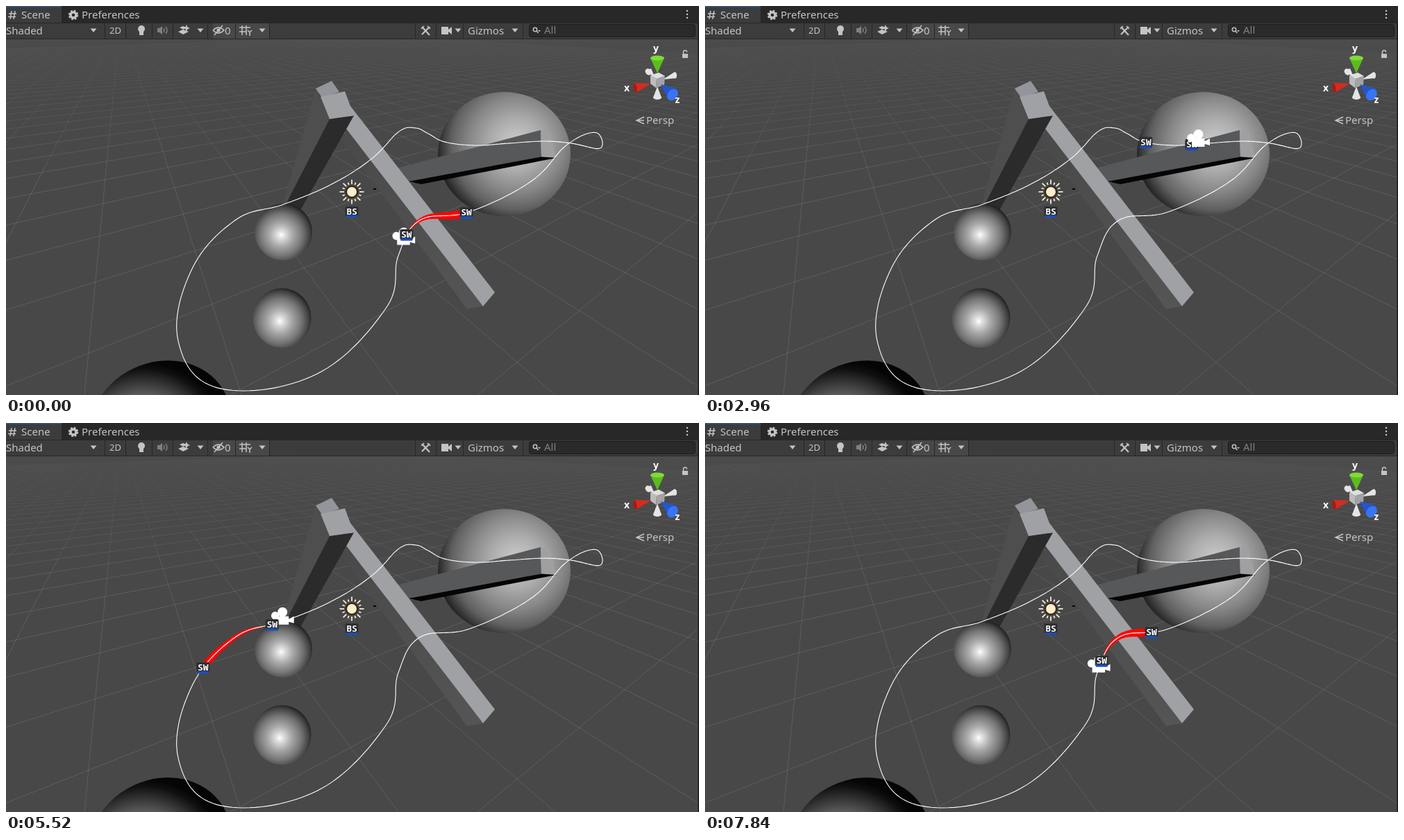
An HTML page that plays this animation: 998 by 561 pixels, repeating every 7920 ms.

```html
<!DOCTYPE html>
<html lang="en">
<head>
<meta charset="utf-8">
<title>Scene view</title>
<style>
html, body { margin: 0; width: 100%; height: 100%; overflow: hidden; background: #484848; }
svg { display: block; width: 100%; height: 100%; }
text { font-family: "Noto Sans", "Open Sans", sans-serif; font-size: 15px; fill: #c4c4c4; }
.axis { font-weight: 700; font-size: 14px; fill: #fff; text-anchor: middle; }
.tag { font: 700 13px "Noto Sans Mono", "DejaVu Sans Mono", monospace; fill: #fff; text-anchor: middle;
  stroke: #222; stroke-width: 1.5px; paint-order: stroke; }
.icon { fill: #c4c4c4; }
.line { fill: none; stroke: #c4c4c4; stroke-width: 1.5; }
.dim { fill: #808080; }
</style>
</head>
<body>
<svg viewBox="0 0 998 561">
  <defs>
    <radialGradient id="ballBig" gradientUnits="userSpaceOnUse" cx="735" cy="200" r="125">
      <stop offset="0" stop-color="#cfcfcf"/><stop offset=".3" stop-color="#acacac"/>
      <stop offset=".55" stop-color="#868686"/><stop offset=".75" stop-color="#606060"/>
      <stop offset=".9" stop-color="#2a2a2a"/><stop offset="1" stop-color="#0c0c0c"/>
    </radialGradient>
    <radialGradient id="ball" cx=".46" cy=".55" r=".57">
      <stop offset="0" stop-color="#fff"/><stop offset=".12" stop-color="#dedede"/>
      <stop offset=".35" stop-color="#aaa"/><stop offset=".65" stop-color="#757575"/>
      <stop offset=".88" stop-color="#404040"/><stop offset="1" stop-color="#1a1a1a"/>
    </radialGradient>
    <radialGradient id="ballLow" gradientUnits="userSpaceOnUse" cx="185" cy="625" r="125">
      <stop offset="0" stop-color="#b0b0b0"/><stop offset=".5" stop-color="#7c7c7c"/>
      <stop offset=".72" stop-color="#434343"/><stop offset=".92" stop-color="#101010"/>
      <stop offset="1" stop-color="#050505"/>
    </radialGradient>
    <linearGradient id="haze" x1="0" y1="0" x2="0" y2="1">
      <stop offset="0" stop-color="#4b4b4b" stop-opacity=".9"/>
      <stop offset="1" stop-color="#484848" stop-opacity="0"/>
    </linearGradient>
    <linearGradient id="side" x1="0" y1="0" x2="0" y2="1">
      <stop offset="0" stop-color="#494949"/><stop offset="1" stop-color="#555"/>
    </linearGradient>
    <clipPath id="behind">
      <path clip-rule="evenodd" d="M0 0H998V561H0ZM497 146L704 413L687 433L664 437L484 193Z"/>
    </clipPath>
    <path id="drop" d="M-4.5 -2.5H4.5L0 3Z"/>
    <g id="badge">
      <rect x="-9.5" y="-8" width="19" height="15" rx="2" fill="#2e3036"/>
      <rect x="-8.5" y="4.5" width="17" height="4" fill="#1d4db4"/>
    </g>
    <g id="sw"><use href="#badge"/><text class="tag" y="4">SW</text></g>
    <g id="camShape" fill="#fff">
      <circle cx="-10" cy="-1" r="5.8"/><circle cx=".5" cy="-6" r="7"/>
      <path d="M-9 0H9.5V12H-9ZM9.5 4L17 0V10L9.5 8Z"/>
    </g>
  </defs>

  <rect width="998" height="561" fill="#484848"/>
  <path id="grid" fill="none" stroke="#fff" stroke-opacity=".13" stroke-width=".9"/>
  <rect y="47" width="998" height="200" fill="url(#haze)"/>

  <!-- solids -->
  <ellipse cx="717.5" cy="213.5" rx="95.5" ry="89.5" fill="url(#ballBig)"/>
  <path d="M555 236L770 179L771 218L570 255Z" fill="#57585a"/>
  <path d="M770 179L784 183L792 219L771 219Z" fill="#a0a0a2"/>
  <path d="M580 253L771 217.500L793 219L598 257ZM529 263H533V265H529Z" fill="#050505"/>
  <path d="M492 178L687 433L664 437L484 193Z" fill="url(#side)"/>
  <path d="M495 143L704 413L687 433L490 177Z" fill="#a0a1a5"/>
  <path d="M446 119L466 163L404 292L397 292Z" fill="#4e4e4e"/>
  <path d="M466 163L501 158L422 298L401 290Z" fill="#2b2b2b"/>
  <path d="M446 119L469 108L480 124L455 132Z" fill="#94959a"/>
  <path d="M453 131L488 123L501 158L466 163Z" fill="#a0a1a5"/>
  <ellipse cx="399.5" cy="326" rx="41.5" ry="41" fill="url(#ball)"/>
  <ellipse cx="397.5" cy="450" rx="42" ry="43" fill="url(#ball)"/>
  <ellipse cx="222" cy="604" rx="104" ry="90" transform="rotate(-25 222 604)" fill="url(#ballLow)"/>

  <path id="ribbon" fill="#f00"/>
  <path id="car" d="M-8 -8L-3 -15L9 -13L8 -4L-8 -4Z" fill="#5b5b5b"/>
  <path id="track" fill="none" stroke="#fff" stroke-width="1.1"/>

  <!-- light -->
  <g transform="translate(498 268)">
    <g id="rays" stroke="#fff3da" stroke-width="1.7"></g>
    <circle r="8" fill="#ffecc9" stroke="#2a2520" stroke-width="2"/>
  </g>
  <g transform="translate(498 297)"><use href="#badge"/><text class="tag" y="4">BS</text></g>
  <g id="actors">
    <use id="head" href="#sw"/><use id="cam" href="#camShape"/><use id="tail" href="#sw"/>
  </g>

  <!-- axis gizmo -->
  <g fill="#e4e4e4">
    <path d="M920 94L929 90L934 102Z"/><path d="M963 95L965 104L946 106Z"/><path d="M932 132H944L938 116Z"/>
    <ellipse cx="925" cy="95" rx="4" ry="5" transform="rotate(-35 925 95)"/>
    <ellipse cx="963.5" cy="100" rx="2.5" ry="4.5"/><ellipse cx="938" cy="132" rx="6" ry="3"/>
  </g>
  <path d="M928 100L937 105L936 118L928 112Z" fill="#bcbcbc"/>
  <path d="M928 100L940 96L949 101L937 105Z" fill="#dedede"/>
  <path d="M937 105L949 101L948 114L936 118Z" fill="#a3a3a3"/>
  <path d="M928 75H948L938 97Z" fill="#5dbb1f"/><ellipse cx="938" cy="75" rx="10" ry="3.5" fill="#7fdc36"/>
  <path d="M904 111L907 125L929 112Z" fill="#d62b20"/>
  <ellipse cx="906" cy="118" rx="2.5" ry="7" transform="rotate(-12 906 118)" fill="#a51c15"/>
  <path d="M943 113L966 119L954 135Z" fill="#2456cf"/>
  <ellipse cx="960" cy="128" rx="9" ry="7" transform="rotate(-50 960 128)" fill="#3974f2"/>
  <text class="axis" x="936" y="66">y</text><text class="axis" x="894" y="123">x</text><text class="axis" x="967" y="140">z</text>
  <path class="icon" d="M974 69H982V75H974Z"/><path class="line" d="M975.5 69V66.5A2.5 2.5 0 0 1 980.5 66.5"/>
  <path class="line" d="M919 160L908 165L919 170M908 165H919"/>
  <text x="922" y="170">Persp</text>

  <!-- tabs -->
  <rect width="998" height="24" fill="#282828"/>
  <rect width="80" height="24" fill="#3c3c3c"/><rect width="80" height="1.5" fill="#2c5d87"/>
  <path class="line" d="M8 7L6 19M13 7L11 19M4 11H15M3 15.5H14"/>
  <text x="22" y="18">Scene</text>
  <circle cx="97" cy="13" r="4" fill="none" stroke="#c4c4c4" stroke-width="3.5"/>
  <circle cx="97" cy="13" r="6" fill="none" stroke="#c4c4c4" stroke-width="2.5" stroke-dasharray="2.6 2.112"/>
  <text x="109" y="18">Preferences</text>
  <path d="M981 7V18" stroke="#c4c4c4" stroke-width="2.6" stroke-linecap="round" stroke-dasharray="0 5"/>

  <!-- toolbar -->
  <rect y="24" width="998" height="23" fill="#3c3c3c"/>
  <path d="M298 25H380V47H298Z" fill="#484848"/>
  <path id="seams" stroke="#272727"/>
  <g id="drops" class="icon"></g>
  <text x="0" y="40.5">Shaded</text>
  <g class="icon">
    <circle cx="195" cy="33" r="5"/><path d="M192 36H198V42H192Z"/>
    <path d="M248 37L255 34L263 37L255 41ZM250 31L255 29L260 31L255 34Z"/>
    <path d="M260 27L261.5 30.5L265 32L261.5 33.5L260 37L258.5 33.5L255 32L258.5 30.5Z"/>
    <path d="M627 30H637V41H627ZM637 34L642 30V41L637 37Z"/>
  </g>
  <path class="dim" d="M218 32H221L225 29V41L221 38H218Z"/>
  <path class="line" style="stroke:#808080" d="M227 32Q229 35 227 38M230 30Q234 35 230 40"/>
  <text x="149" y="40" style="font-size:13px">2D</text>
  <path class="line" d="M298 35Q306 27 314 35Q306 43 298 35M300 42L312 28"/><circle class="icon" cx="306" cy="35" r="2.5"/>
  <text x="315" y="40.5">0</text>
  <path class="line" d="M340 28V42M346 28V42M336 31H352M336 37H346M348 35L351 38L354 35M351 38V43"/>
  <path class="line" style="stroke-width:2.2" d="M599 30L610 42M610 30L599 41"/>
  <path class="line" d="M598 33L602 29M607 29L611 33"/>
  <text x="665" y="40.5">Gizmos</text>
  <rect x="753.5" y="26.5" width="239" height="18" rx="3" fill="#2a2a2a" stroke="#1c1c1c"/>
  <circle class="line" cx="762" cy="34" r="2.7"/><path class="line" d="M764 36L766.5 39"/>
  <use class="icon" href="#drop" transform="translate(768 36) scale(.45)"/>
  <text class="dim" x="775" y="40">All</text>
  <rect x="996.5" y="24" width="1.5" height="537" fill="#191919"/>
</svg>
<script>
const LOOP = 7920, STEPS = 103, STAMP = 40;
const HEAD_LAG = 480, CAM_LAG = 65, CAM_LIFT = 8;
const $ = id => document.getElementById(id);
const wrap = t => (t % LOOP + LOOP) % LOOP;

// key points of the closed track, passed at equal intervals of time
const knots = [
  [596, 309], [667, 297], [756, 253], [808, 200], [849, 182.5], [856, 205], [814, 198], [775, 195],
  [724, 198], [676, 201], [632, 196], [608, 184], [590, 176], [566, 181], [527, 220], [469, 257],
  [400, 286], [330, 309], [267, 381], [248, 483], [306, 551], [445, 532], [547, 436], [565, 360]
];
const TENSION = .56;

// rear marker at a time: a cardinal spline through the key points
function place(t) {
  const n = knots.length, u = wrap(t) / LOOP * n - .5, i = Math.floor(u), s = u - i;
  const [a, b, c, d] = [-1, 0, 1, 2].map(k => knots[(i + k + n) % n]);
  const s2 = s * s, s3 = s2 * s;
  return [0, 1].map(k =>
    (2 * s3 - 3 * s2 + 1) * b[k] + (s3 - 2 * s2 + s) * TENSION * (c[k] - a[k]) +
    (3 * s2 - 2 * s3) * c[k] + (s3 - s2) * TENSION * (d[k] - b[k]));
}

// 1 at the point of the lap closest to the viewer, -1 at the farthest
const nearness = t => Math.cos(2 * Math.PI * (t - 6900) / LOOP);
const polygon = pts => "M" + pts.map(p => p.map(v => v.toFixed(1)).join(" ")).join("L") + "Z";

function ribbon(t) {
  const width = 5.5 + 9 * nearness(t), left = [], right = [];
  if (width <= 0) return "";
  for (let s = .12; s <= 1; s += .04) {
    const u = t + HEAD_LAG * s, [x, y] = place(u), [x0, y0] = place(u - 4), [x1, y1] = place(u + 4);
    const half = width * Math.min(1, .05 + 1.1 * s) / 2 / Math.hypot(x1 - x0, y1 - y0);
    const nx = (y0 - y1) * half, ny = (x1 - x0) * half;
    left.push([x + nx, y + ny]);
    right.unshift([x - nx, y - ny]);
  }
  return polygon(left.concat(right));
}

function drawStatic() {
  const pts = [];
  for (let t = 0; t < LOOP; t += 20) pts.push(place(t));
  $("track").setAttribute("d", polygon(pts));

  // ground lines run to two vanishing points on a hidden horizon
  let d = "";
  for (let k = -34; k <= 40; k++) d += `M165 20L${113 + 226 * k} 561`;
  for (let k = -45; k <= 9; k++) d += `M1330 20L${-33 + 356 * k} 561`;
  $("grid").setAttribute("d", d);

  let rays = "";
  for (let a = 0; a < 360; a += 22.5)
    rays += `<path d="M0 -11V${a % 45 ? -14.5 : -17.5}" transform="rotate(${a})"/>`;
  $("rays").innerHTML = rays;

  $("drops").innerHTML = [126, 280, 369, 651, 733].map(x => `<use href="#drop" x="${x}" y="35"/>`).join("");
  $("seams").setAttribute("d", "M0 24.5H998M0 47.5H998" +
    [142, 172, 210, 240, 290, 330, 379, 589, 619, 658, 744].map(x => `M${x}.5 24V47`).join(""));
}

const move = (el, [x, y]) => el.setAttribute("transform", `translate(${x.toFixed(1)} ${y.toFixed(1)})`);

function draw(t) {
  const tail = place(t), [cx, cy] = place(t - CAM_LAG);
  move($("tail"), tail);
  move($("car"), tail);
  move($("head"), place(t + HEAD_LAG));
  move($("cam"), [cx, cy - CAM_LIFT]);
  $("car").style.display = nearness(t) > .9 ? "" : "none";

  // on the far half the bar hides the ribbon; on the way out the camera covers its marker
  $("ribbon").setAttribute("d", ribbon(t));
  $("ribbon").setAttribute("clip-path", t > LOOP * .4 && t < LOOP * .67 ? "url(#behind)" : "none");
  const order = t > LOOP * .05 && t < LOOP * .45 ? ["tail", "cam"] : ["cam", "tail"];
  $("actors").append(...order.map($));
}

// steps are evenly spread over the loop, each stamped down to a multiple of STAMP
function stampAt(now) {
  const floor = v => Math.floor(v / STAMP) * STAMP;
  const i = Math.ceil((floor(now) + STAMP) * STEPS / LOOP) - 1;
  return floor(i * LOOP / STEPS);
}

let shown = -1;
function loop() {
  const t = stampAt(wrap(performance.now()));
  if (t !== shown) draw(shown = t);
  requestAnimationFrame(loop);
}
drawStatic();
loop();
</script>
</body>
</html>
```
